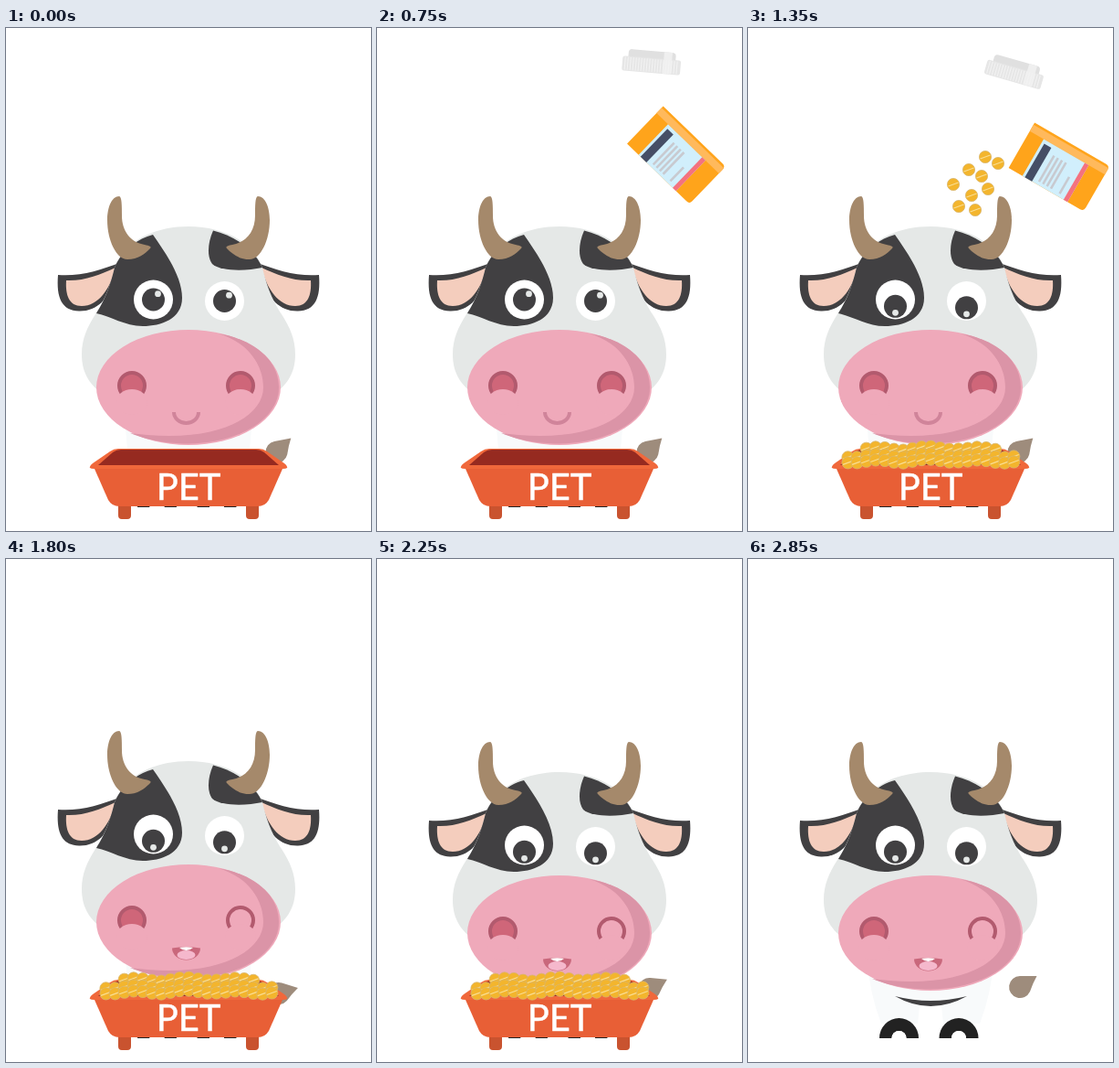
Animation of 400 by 550 pixels, one loop 3000 ms. Source, as an HTML page:

```html
<!DOCTYPE html>
<html lang="en">
<head>
<meta charset="utf-8">
<title>Cow and feed bowl</title>
<style>
  html, body { margin: 0; width: 100%; height: 100%; overflow: hidden; background: #fff; }
  svg { display: block; width: 400px; height: 550px; }
  .label { font: 400 40px Lato, "Open Sans", sans-serif; fill: #fff; stroke: #fff; stroke-width: .5; stroke-linejoin: round; }
</style>
</head>
<body>
<svg viewBox="0 0 400 550">
  <defs>
    <g id="ear">
      <path fill="#414042" d="M57 270C80 272 104 265 126 256L119 276C112 296 100 310 80 309.500C61 309 55 295 57 270Z"/>
      <path fill="#f4cdbd" d="M66 276C85 277 103 270 120 262C114 286 101 304 83 304C69 304 65 292 66 276Z"/>
    </g>
    <path id="horn" fill="#a5896b" d="M124 184C116 184 111 196 111 210C111 232 121 253 133 253C145 253 152 247 158 241C160 239 157 238 152 237C136 234 127 222 127 205C127 195 127 184 124 184Z"/>
    <g id="nostril">
      <circle r="14" stroke="#b25a6e" stroke-width="4"/>
      <ellipse cy="18" rx="17" ry="14" fill="#efa9ba"/>
    </g>
    <g id="pill">
      <circle r="6.600" fill="#f3b52d" stroke="#d9b56c" stroke-width=".8"/>
      <path d="M-5.500 2L5.500-2" stroke="#f9dd92" stroke-width="1.200"/>
    </g>
    <g id="hoof">
      <path fill="#222" d="M-21.500 0A21.500 22 0 0 1 21.500 0H8A8 8 0 0 0-8 0Z"/>
      <path fill="#fff" d="M-8 0A8 8 0 0 1 8 0Z"/>
    </g>
  </defs>

  <path id="tail" fill="#9e8c7c" d="M316.500 456H298A12 12 0 1 0 309 473Q312 464 316.500 456Z"/>

  <path fill="#f8fafb" d="M131 436H269Q268 472 254 508H214L212 488H188L186 508H146Q132 472 131 436Z"/>
  <path fill="#414042" d="M161 478Q200 488 240 478Q200 500 161 478Z"/>
  <use href="#hoof" x="165.500" y="524"/>
  <use href="#hoof" x="231" y="524"/>

  <g id="head">
    <use href="#ear"/>
    <use href="#ear" transform="matrix(-1 0 0 1 400 0)"/>
    <path fill="#e5e8e7" d="M200 217C165 217 131 231 119 262C113 288 105 302 98 313C89 327 83 340 83 357C83 378 93 393 110 402H290C307 393 317 378 317 357C317 340 311 327 302 313C295 302 287 288 281 262C269 231 235 217 200 217Z"/>
    <path fill="#414042" d="M161 226C175 246 193 272 193 295C193 318 170 326 150 326C130 326 115 315 99 312C107 299 113 287 119 262C125 246 142 231 161 226Z"/>
    <path fill="#414042" d="M227 221.500C221 235 220 250 226 258C235 266 262 266 281 262C272 242 250 227 227 221.500Z"/>
    <use href="#horn"/>
    <use href="#horn" transform="matrix(-1 0 0 1 400 0)"/>
    <circle cx="161.500" cy="297" r="21.500" fill="#fff"/>
    <circle cx="239.500" cy="298.500" r="21.500" fill="#fff"/>
    <g id="eyes"></g>
    <ellipse cx="200" cy="393" rx="101" ry="63" fill="#efa9ba"/>
    <path fill="#db94a7" d="M232 334C262 342 282 366 282 393C282 425 232 456 136 443C160 453 185 454.500 200 454.500C255 454 299 428 299 393C299 362 270 340 232 334Z"/>
    <use href="#nostril" x="138" y="391" fill="#cf6679"/>
    <use id="nose" href="#nostril" x="257" y="391"/>
    <path id="smile" fill="none" stroke="#d0849a" stroke-width="4" d="M184 420A13.500 12 0 0 0 211 420"/>
    <g id="mouth">
      <path fill="#c9687c" d="M182 421.500Q197.500 419 213 421.500A15.500 13 0 0 1 182 421.500Z"/>
      <ellipse cx="197.500" cy="429" rx="10" ry="5" fill="#f5b8cc"/>
      <path fill="#fff" d="M190 421Q197.500 419.500 205 421Q197.500 427 190 421Z"/>
    </g>
  </g>

  <g id="bowl">
    <path fill="#c9532f" d="M123 518H137V533Q137 537 133 537H127Q123 537 123 533ZM263 518H277V533Q277 537 273 537H267Q263 537 263 533Z"/>
    <path fill="#f0683b" d="M92 481Q91 479 95 476L114 463Q118 460 123 460H277Q282 460 286 463L305 476Q309 479 308 481Q307 482 303 482H97Q93 482 92 481Z"/>
    <path fill="#962a20" d="M101 478L117 464Q121 461 126 461H274Q279 461 283 464L299 478Z"/>
    <path fill="#e85f36" d="M97 482H303L288 516Q284 523 276 523H124Q116 523 112 516Z"/>
    <text class="label" x="200" y="516" text-anchor="middle">PET</text>
    <g id="feed"></g>
  </g>

  <g id="drops"></g>

  <g id="bottle">
    <path fill="#ffa41b" d="M-28.500-47.500H28.500V43Q28.500 47.500 24 47.500H-24Q-28.500 47.500-28.500 43Z"/>
    <path fill="#ffb95c" d="M18-47.500H26V47.500H18Z"/>
    <path fill="#d1effc" d="M-28.500-30H18V27H-28.500Z"/>
    <path fill="#454e66" d="M-28.500-27H14V-18H-28.500Z"/>
    <path fill="#f4727f" d="M-28.500 22H18V27H-28.500Z"/>
    <path stroke="#c8cad0" stroke-width="2.600" d="M-25-11H8M-25-6H8M-25-1H8M-25 4H8M-25 15H-4"/>
  </g>
  <g id="cap">
    <rect x="-26" y="-12" width="52" height="14" rx="4" fill="#e0e0e0"/>
    <rect x="-32" y="-4" width="64" height="16" rx="2.500" fill="#e6e6e6"/>
    <path fill="#efefef" d="M13-12H22V12H13Z"/>
    <path id="ribs" stroke="#f3f3f3" stroke-width="1"/>
  </g>
</svg>

<script>
const STEP = 150, COUNT = 20;
const $ = id => document.getElementById(id);
const NS = "http://www.w3.org/2000/svg";

function add(parent, tag, attrs) {
  const el = document.createElementNS(NS, tag);
  for (const key in attrs) el.setAttribute(key, attrs[key]);
  return parent.appendChild(el);
}
const show = (el, on) => el.setAttribute("visibility", on ? "visible" : "hidden");
const place = (el, [x, y, turn]) => el.setAttribute("transform", `translate(${x} ${y}) rotate(${turn})`);

// Value of the latest key at or before the step
const held = (keys, step) => keys.filter(k => k[0] <= step).pop()[1];

const eyes = [[161.5, 297], [239.5, 298.5]].map(([x, y]) => ({
  x, y,
  pupil: add($("eyes"), "circle", { cx: x, r: 12.5, fill: "#414042" }),
  shine: add($("eyes"), "circle", { r: 3.4, fill: "#e5e8e7" })
}));

// Three heaps of feed, the back one first
const rowY = i => 474 + 1.6 * Math.sin(i * 1.15 + 1) - (i > 6 && i < 13 ? 0.8 : 0);
const rows = [[2, 16, 14, 9, 16], [0, 18, 6, 8, 16], [0, 18, 0, 7, 17]].map(([a, b, lift, from, to]) => {
  const g = add($("feed"), "g", {});
  for (let i = a; i <= b; i++)
    add(g, "use", { href: "#pill", x: 109.5 + i * 10.1, y: rowY(i) - lift });
  return { g, from, to };
});

// x, y, first step
const drops = [
  [260, 140, 7], [274, 147, 7], [256, 161, 7],
  [242, 154, 8], [263, 175, 8], [245, 182, 8],
  [225, 170, 9], [231, 194, 9], [249, 198, 9]
].map(([x, y, from]) => ({ from, el: add($("drops"), "use", { href: "#pill", x, y }) }));

let ribs = "";
for (let x = -29; x < 31; x += 3) ribs += `M${x}-3V11`;
$("ribs").setAttribute("d", ribs);

// x, y, turn for steps 1 to 9
const bottlePath = [
  [321.5, 128.5, 0], [323, 121, -28], [326, 128.5, -39], [327, 133, -42], [328, 139, -46],
  [341, 144, -60], [341, 151, -60], [341, 151, -60], [341, 152, -60]
];
const capPath = [
  [321.5, 69, 0], [302.5, 49, -6], [302.5, 52, -6], [302.5, 48, -6], [301, 37, 5],
  [292.5, 40, 16], [292.5, 46, 16], [292.5, 38, 16], [292.5, 47, 16]
];
const headY = [[0, 0], [11, 2], [12, 4], [13, 8], [14, 12], [15, 16]];
const tailTurn = [[0, -11], [11, 8], [12, 17], [13, 5], [16, -3], [17, -11], [18, 0]];
const bowlAlpha = [[0, 1], [16, 0.85], [18, 0.45], [19, 0]];

function draw(step) {
  const pouring = step >= 1 && step <= 9;
  for (const [id, path] of [["bottle", bottlePath], ["cap", capPath]]) {
    show($(id), pouring);
    if (pouring) place($(id), path[step - 1]);
  }
  for (const d of drops) {
    show(d.el, pouring && step >= d.from);
    d.el.setAttribute("transform", `translate(0 ${step === 9 ? 1 : 0})`);
  }
  for (const r of rows) show(r.g, step >= r.from && step < r.to);

  const down = step >= 8;
  for (const e of eyes) {
    e.pupil.setAttribute("cy", e.y + (down ? 7.3 : 0));
    e.shine.setAttribute("cx", e.x + (down ? 0 : 5));
    e.shine.setAttribute("cy", e.y + (down ? 14.3 : -6.3));
  }
  const open = step >= 10;
  show($("mouth"), open);
  show($("smile"), !open);
  $("nose").setAttribute("fill", open ? "#efa9ba" : "#cf6679");

  $("head").setAttribute("transform", `translate(0 ${held(headY, step)})`);
  $("tail").setAttribute("transform", `rotate(${held(tailTurn, step)} 275 474)`);
  $("bowl").setAttribute("opacity", held(bowlAlpha, step));
}

const start = performance.now();
let last = -1;
function tick() {
  const step = Math.floor((performance.now() - start) / STEP) % COUNT;
  if (step !== last) draw(last = step);
  requestAnimationFrame(tick);
}
tick();
</script>
</body>
</html>
```
